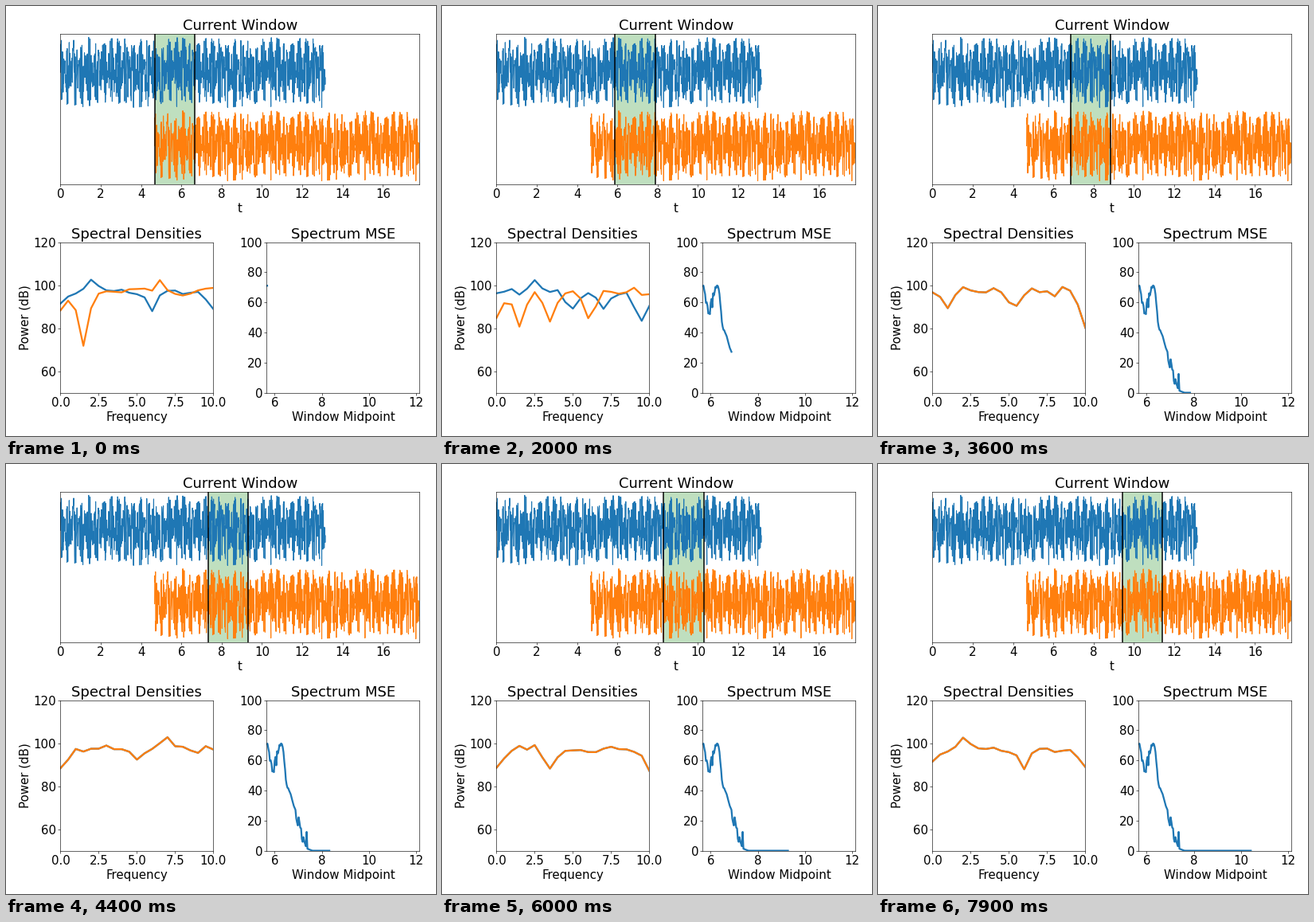
These frames come from a looping animation (540 px wide and 540 px high, 8 s). A matplotlib script:

```python
import itertools

import numpy as np
import matplotlib.pyplot as plt
from matplotlib.animation import FuncAnimation

FRAMES, INTERVAL = 80, 100
SIZE = 540
BLUE, ORANGE = "#1f77b4", "#ff7f0e"
START, STEP, WIDTH = 4.68, 0.06, 2.0  # sliding window, in seconds
DELAY = 4.67                          # lag of the second signal
LEVEL = 97.0                          # typical power in dB

rng = np.random.default_rng(12)


def make_signal(lead=156, period=420, count=1183):
    """Noise bursts: a short lead-in, then a section that repeats."""
    t = np.arange(count) * DELAY / period
    envelope = 0.3 + 0.7 * np.abs(np.cos(np.pi * t / 0.36))
    x = np.tanh(0.95 * rng.normal(size=count)) * envelope
    for i in range(lead + period, count):
        x[i] = x[i - period]
    return t, x


freq = np.arange(0, 10.1, 0.5)


def pose(*bumps):
    """Amplitude spectrum: a rippled level with bumps of (frequency, dB)."""
    db = rng.normal(0, 1, freq.size)
    for center, gain in bumps:
        db += gain * np.exp(-((freq - center) / 0.5) ** 2)
    return 10 ** (db / 20)


def wander(poses, sigma=0.12):
    """Complex random walk per bin that passes through the poses."""
    out = np.zeros((FRAMES, freq.size), complex)
    for (a, p), (b, q) in itertools.pairwise(sorted(poses.items())):
        n = b - a + 1
        u = np.linspace(0, 1, n)[:, None]
        real, imag = rng.normal(0, sigma, (2, n, freq.size))
        walk = np.cumsum(real + 1j * imag, axis=0)
        walk -= walk[0]
        out[a:b + 1] = p + (q - p) * u + walk - u * walk[-1]
    return out


def to_db(amp):
    return LEVEL + 20 * np.log10(np.maximum(np.abs(amp), 0.02))


def make_spectra():
    """Two independent spectra that lock together after 29 steps."""
    home = pose((0, -5), (2, 6), (6, -7), (10, -7))
    shared = {36: pose((1, -7), (5.3, -8), (10, -16)),
              44: pose((0, -8), (5, -4), (7, 5)),
              60: pose((0, -8), (3.5, -10), (10, -11)),
              79: home}
    first = {0: home,
             9: pose((0, -15), (3.5, -10), (7, -12), (8, -18)),
             20: pose((2.5, 4), (5, -10), (7, -8), (9.5, -15))}
    second = {0: pose((0, -8), (1.5, -25), (6.5, 5)),
              9: pose((0, -7), (2, -13), (5, -27)),
              20: pose((0, -12), (1.5, -16), (3.5, -13), (6, -12))}
    amp1 = wander({**first, **shared})
    amp2 = wander({**second, **shared})
    apart = np.clip((29 - np.arange(FRAMES)) / 9, 0, 1)[:, None]
    return to_db(amp1), to_db(amp1 + apart * (amp2 - amp1))


def make_error():
    """Rough fall to zero, calm midway, with one late spike."""
    x = np.arange(5.66, 12, 1 / 29.5)
    y = np.interp(x, [5.66, 5.88, 6.0, 6.28, 6.5, 6.7, 7.1, 7.35, 7.6],
                  [71, 54, 57, 74, 44, 36, 14, 1.5, 0])
    rough = np.where(np.abs(x - 6.65) < 0.2, 0.5, 3.5) * (x < 7.25)
    y += rough * rng.uniform(-1.3, 1.3, x.size)
    y[np.argmin(np.abs(x - 7.36))] = 12.5
    y[0] = 71
    return x, np.maximum(y, 0)


t, signal = make_signal()
db1, db2 = make_spectra()
err_x, err_y = make_error()

plt.rcParams.update({"font.family": "DejaVu Sans", "font.size": 20,
                     "axes.titlesize": 24, "axes.labelsize": 20})
fig = plt.figure(figsize=(10, 10), dpi=54, facecolor="white")


def panel(left, top, right, bottom, title, xlabel, xlim, ylim, xticks, yticks):
    ax = fig.add_axes([left / SIZE, 1 - bottom / SIZE,
                       (right - left) / SIZE, (bottom - top) / SIZE])
    ax.set(title=title, xlabel=xlabel, xlim=xlim, ylim=ylim,
           xticks=xticks, yticks=yticks)
    return ax


ax_sig = panel(68.4, 34.6, 519.4, 223.6, "Current Window", "t",
               (0, 17.82), (-2.05, 2.05), range(0, 17, 2), [])
ax_psd = panel(68.4, 296.6, 260.4, 485.6, "Spectral Densities", "Frequency",
               (0, 10), (50, 120), np.arange(0, 10.1, 2.5), range(60, 121, 20))
ax_err = panel(327.4, 296.6, 519.4, 485.6, "Spectrum MSE", "Window Midpoint",
               (5.66, 12.15), (0, 100), range(6, 13, 2), range(0, 101, 20))
ax_psd.set_ylabel("Power (dB)")

ax_sig.plot(t, signal + 1, color=BLUE, lw=1.5)
ax_sig.plot(t + DELAY, signal - 1, color=ORANGE, lw=1.5)
span = ax_sig.axvspan(START, START + WIDTH, color="green", alpha=0.25, lw=0)
edges = [ax_sig.axvline(START, color="black", lw=2, zorder=3)
         for _ in range(2)]
line1, = ax_psd.plot(freq, db1[0], color=BLUE, lw=3)
line2, = ax_psd.plot(freq, db2[0], color=ORANGE, lw=3)
err_line, = ax_err.plot([], [], color=BLUE, lw=3)


def update(i):
    left = START + STEP * i
    span.set_x(left)
    for edge, x in zip(edges, (left, left + WIDTH)):
        edge.set_xdata([x, x])
    line1.set_ydata(db1[i])
    line2.set_ydata(db2[i])
    mid = left + WIDTH / 2
    xs = np.append(err_x[err_x < mid], mid)
    err_line.set_data(xs, np.interp(xs, err_x, err_y))
    return span, *edges, line1, line2, err_line


anim = FuncAnimation(fig, update, frames=FRAMES, interval=INTERVAL,
                     repeat=True, repeat_delay=0, blit=False)
plt.show()
```
